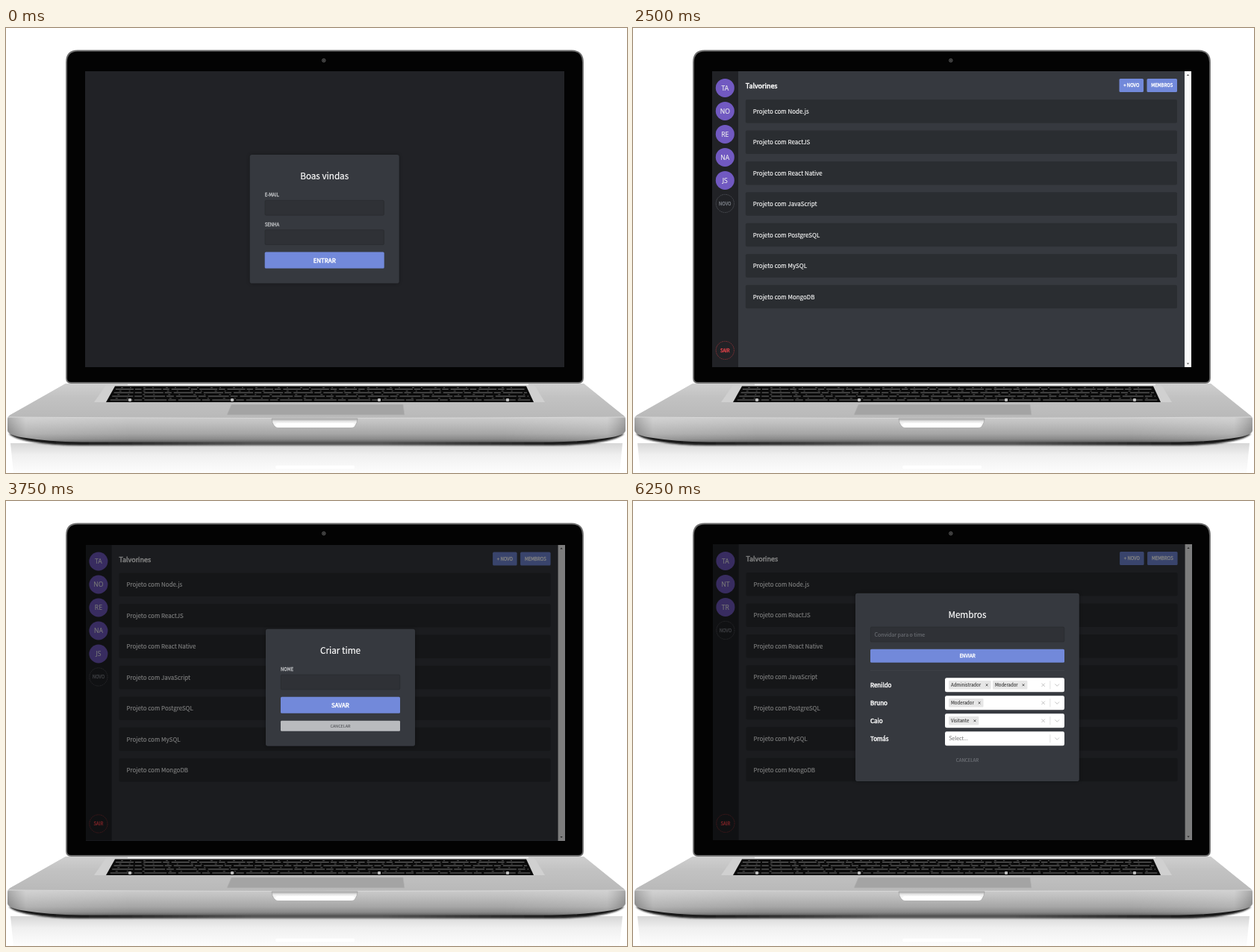
These frames come from a looping animation (832x597 px, 7500 ms). An HTML page:

```html
<!DOCTYPE html>
<html lang="pt">
<head>
<meta charset="utf-8">
<title>Projetos</title>
<style>
  html, body { margin: 0; width: 100%; height: 100%; overflow: hidden; background: #fff; }
  svg { display: block; width: 832px; height: 597px; }
  text { font-family: "Noto Sans CJK JP", "Noto Sans CJK SC", "Noto Sans CJK", sans-serif; white-space: pre; }
  .avatar { font-family: "Open Sans", "Noto Sans", sans-serif; }
</style>
</head>
<body>
<svg viewBox="0 0 832 597">
  <defs>
    <linearGradient id="deck" x1="0" y1="477" x2="0" y2="523" gradientUnits="userSpaceOnUse">
      <stop offset="0" stop-color="#cfcfcf"/><stop offset=".4" stop-color="#c2c2c2"/><stop offset="1" stop-color="#b9b9b9"/>
    </linearGradient>
    <linearGradient id="front" x1="0" y1="521" x2="0" y2="557" gradientUnits="userSpaceOnUse">
      <stop offset="0" stop-color="#cdcdcd"/><stop offset=".25" stop-color="#c0c0c0"/>
      <stop offset=".65" stop-color="#a6a6a6"/><stop offset=".85" stop-color="#8a8a8a"/><stop offset="1" stop-color="#555"/>
    </linearGradient>
    <linearGradient id="sides">
      <stop offset="0" stop-color="#000" stop-opacity=".18"/><stop offset=".03" stop-color="#fff" stop-opacity=".14"/>
      <stop offset=".2" stop-color="#fff" stop-opacity="0"/><stop offset=".8" stop-color="#fff" stop-opacity="0"/>
      <stop offset=".97" stop-color="#fff" stop-opacity=".14"/><stop offset="1" stop-color="#000" stop-opacity=".18"/>
    </linearGradient>
    <linearGradient id="mirror" x1="0" y1="0" x2="0" y2="1">
      <stop offset="0" stop-color="#d6d6d6"/><stop offset=".4" stop-color="#f0f0f0"/><stop offset="1" stop-color="#fdfdfd"/>
    </linearGradient>
    <linearGradient id="shade">
      <stop offset="0" stop-color="#111"/><stop offset=".15" stop-color="#222"/><stop offset=".4" stop-color="#555"/>
      <stop offset=".6" stop-color="#555"/><stop offset=".85" stop-color="#222"/><stop offset="1" stop-color="#111"/>
    </linearGradient>
    <linearGradient id="notch" x1="0" y1="0" x2="0" y2="1">
      <stop offset="0" stop-color="#a5a5a5"/><stop offset=".35" stop-color="#eee"/><stop offset="1" stop-color="#fff"/>
    </linearGradient>
    <filter id="glow" x="-10%" y="-10%" width="120%" height="120%"><feGaussianBlur stdDeviation="2.5"/></filter>
    <filter id="soft" x="-5%" y="-50%" width="110%" height="200%"><feGaussianBlur stdDeviation=".9"/></filter>
    <path id="body" d="M80 477H774L826 519Q830 521 830 525V540Q829 546 812 549Q775 555 730 555.500H102Q57 555 20 549Q3 546 2 540V525Q2 521 6 519Z"/>
  </defs>

  <path d="M6 557H826L822 597H10Z" fill="url(#mirror)"/>
  <path d="M4 544Q10 551 34 555Q62 560 100 560H732Q770 560 798 555Q822 551 828 544Z" fill="url(#shade)" filter="url(#soft)"/>

  <use href="#body" fill="url(#front)"/>
  <use href="#body" fill="url(#sides)"/>
  <path d="M80 477H774L826 519Q828 520 829 522Q416 525 3 522Q4 520 6 519Z" fill="url(#deck)"/>
  <path d="M3 522Q416 525 829 522" fill="none" stroke="#d6d6d6" stroke-width="1.200"/>
  <path d="M134 479H708L722 502H118Z" fill="#d0d0d0"/>
  <path d="M163 478.500H700" stroke="#f4f4f4" stroke-width="1.500"/>
  <g id="keys"></g>
  <path d="M302 505H532L534 519H296Z" fill="#a4a4a4" stroke="#b4b4b4" stroke-width=".7"/>
  <path d="M356 524H471Q470 536 462 536.500H365Q357 536 356 524Z" fill="url(#notch)" stroke="#999" stroke-width=".6"/>
  <rect x="361" y="530" width="106" height="5.500" rx="2.500" fill="#fff"/>
  <rect x="361" y="587" width="106" height="4.500" rx="2" fill="#fff"/>

  <path d="M81 470V46Q81 30.500 96 30.500H758Q773 30.500 773 46V470Q773 476 767 476H87Q81 476 81 470Z" fill="#030303" stroke="#6e6e6e" stroke-width="1.800"/>
  <circle cx="425.800" cy="43.500" r="2.300" fill="#252525" stroke="#5c5c5c" stroke-width=".9"/>
  <circle cx="425.800" cy="43.500" r=".7" fill="#777"/>
  <g id="screens"></g>
</svg>
<script>
const HOLD = 1250;
const BLUE = '#7289da', CARD = '#36393f', INPUT = '#2f3136', DARK = '#212226';

const tag = (name, attrs, inner = '') =>
  `<${name} ${Object.entries(attrs).map(([k, v]) => `${k}="${v}"`).join(' ')}>${inner}</${name}>`;
const rect = (x, y, width, height, fill, rx = 0, more = {}) =>
  tag('rect', { x, y, width, height, fill, rx, ...more });
const path = (d, stroke, width = 1) =>
  tag('path', { d, fill: 'none', stroke, 'stroke-width': width });
const text = (str, x, y, size, fill, more = {}) =>
  tag('text', { x, y, 'font-size': size, fill, stroke: fill, 'stroke-width': size / 60, ...more }, str);
const mid = { 'text-anchor': 'middle' };
const bold = (str, x, y, size, fill, more = {}) =>
  text(str, x, y, size, fill, { 'stroke-width': size / 18, ...more });

function card(x, y, w, h, title) {
  return rect(x, y, w, h, '#000', 3, { opacity: .3, filter: 'url(#glow)' })
    + rect(x, y, w, h, CARD, 2.8)
    + text(title, x + w / 2, y + 33, 11.7, '#fff', mid);
}

const input = (x, y, w) =>
  rect(x + .3, y + .3, w - .6, 19.9, INPUT, 1.5, { stroke: '#27292d', 'stroke-width': .6 });

const button = (label, x, y, w, h, size) =>
  rect(x, y, w, h, BLUE, 1.6) + bold(label, x + w / 2, y + h / 2 + size * .4, size, '#fff', mid);

// Card with labelled fields, a main button and an optional cancel button.
function form(x, y, title, labels, action, cancel) {
  const end = y + 51.5 + labels.length * 39.5;
  let out = card(x, y, 200, end - y + (cancel ? 66 : 42), title);
  labels.forEach((label, i) => {
    const top = y + 61 + i * 39.5;
    out += bold(label, x + 20, top - 5, 5.97, '#b9bbbe') + input(x + 20, top, 160);
  });
  out += button(action, x + 20, end, 160, 22, 7.96);
  if (cancel) {
    out += rect(x + 20, end + 32, 160, 14, '#b9bbbe', 1.4)
      + text('CANCELAR', x + 100, end + 41.2, 5.4, '#55575b', mid);
  }
  return out;
}

function ring(label, y, line, fill) {
  return tag('circle', { cx: 123.3, cy: y, r: 12.1, fill: 'none', stroke: line,
    'stroke-width': .7, 'stroke-dasharray': '1.7 .8' })
    + bold(label, 123.3, y + 2.3, 5.97, fill, mid);
}

function dashboard(teams) {
  let out = rect(106, 58, 642, 397, CARD) + rect(106, 58, 35, 397, DARK);
  teams.forEach((name, i) => {
    const y = 80.4 + i * 31;
    out += tag('circle', { cx: 123.3, cy: y, r: 12.5, fill: '#7159c1' })
      + text(name, 123.3, y + 3.1, 8.6, '#eee', { ...mid, class: 'avatar' });
  });
  out += ring('NOVO', 80.4 + teams.length * 31, '#5b5e64', '#72767d')
    + ring('SAIR', 432.4, '#a8363c', '#e8434a')
    + bold('Talvorines', 150.8, 81.2, 8.95, '#fff')
    + button('+ NOVO', 651.5, 68, 32.5, 18, 5.97)
    + button('MEMBROS', 688.5, 68, 40.5, 18, 5.97);
  ['Node.js', 'ReactJS', 'React Native', 'JavaScript', 'PostgreSQL', 'MySQL', 'MongoDB'].forEach((name, i) => {
    const y = 96 + i * 41.45;
    out += rect(150.8, y, 578.2, 31.5, '#2a2d31', 2) + text('Projeto com ' + name, 160.8, y + 18.8, 7.96, '#fff');
  });
  return out + rect(739, 58, 9, 397, '#fbfbfb')
    + tag('path', { d: 'M741.8 64l1.7-2 1.7 2zM741.8 449.5l1.7 2 1.7-2z', fill: '#555' });
}

const dimmed = teams => dashboard(teams) + rect(106, 58, 642, 397, '#000', 0, { opacity: .5 });

const cross = (x, y, r, color, width) =>
  path(`M${x - r} ${y - r}l${2 * r} ${2 * r}m0 ${-2 * r}l${-2 * r} ${2 * r}`, color, width);

// Each chip: label, left edge, width.
const MEMBERS = [
  ['Renildo', [['Administrador', 422.4, 56.5], ['Moderador', 481.3, 46.5]]],
  ['Bruno', [['Moderador', 422.4, 46.5]]],
  ['Caio', [['Visitante', 422.4, 40.3]]],
  ['Tomás', []]
];

function members() {
  const x = 297.4;
  let out = card(x, 123.8, 299.8, 252.2, 'Membros')
    + input(x + 20, 168.8, 260)
    + text('Convidar para o time', x + 25.6, 181.8, 6.96, '#6d7076')
    + button('ENVIAR', x + 20, 198.8, 260, 18, 6.2)
    + rect(x + 20, 227, 260, .6, '#42454c');
  MEMBERS.forEach(([name, chips], i) => {
    const y = 246.8 + i * 24;
    out += bold(name, x + 20, y + 3.2, 7.96, '#fff') + rect(x + 120, y - 9.5, 160, 19, '#fff', 2.2);
    for (const [label, left, w] of chips) {
      out += rect(left, y - 5.7, w, 11.4, '#e6e6e6', 1.1)
        + text(label, left + 3, y + 2.2, 6, '#333')
        + cross(left + w - 5.4, y, 1.4, '#444', .9);
    }
    out += chips.length ? cross(549, y, 2.2, '#bbb', .9) : text('Select...', 422.6, y + 2.6, 6.96, '#808080');
    out += rect(558, y - 5.5, .6, 11, '#ccc') + path(`M564.8 ${y - 1.3}l2.8 2.8 2.8-2.8`, '#bbb', .9);
  });
  return out + text('CANCELAR', x + 150, 349.6, 6.1, '#74777d', mid);
}

function keyboard() {
  let out = tag('path', { d: 'M146 480.5H697L707 502H134Z', fill: '#0b0b0b' });
  [484.6, 489.2, 494, 499].forEach((y, i) => {
    const left = 146 - (y - 480.5) * .5, right = 697 + (y - 480.5) * .45;
    const gap = 12 + i;
    out += tag('path', { d: `M${left + 3} ${y}H${right - 3}`, stroke: '#8c8c8c', 'stroke-width': .8,
      'stroke-dasharray': `${gap * 2} 2 ${gap * .7} 3` })
      + tag('path', { d: `M${left + 10} ${y - 2.2}H${right - 8}`, stroke: '#6c6c6c', 'stroke-width': .8,
        'stroke-dasharray': `3 ${gap - 3} 2 ${gap + 4}` });
  });
  for (const x of [164, 301, 498, 670]) out += rect(x, 497, 4, 4, '#bdbdbd', 1);
  return out;
}
document.getElementById('keys').innerHTML = keyboard();

const plain = rect(106, 58, 642, 397, DARK);
const TEAMS = ['TA', 'NO', 'RE', 'NA', 'JS'];
// Horizontal shift, vertical shift, content.
const STEPS = [
  [0, 0, plain + form(326.7, 170, 'Boas vindas', ['E-MAIL', 'SENHA'], 'ENTRAR')],
  [.6, .5, plain + form(326.7, 150.3, 'Criar conta', ['NOME', 'E-MAIL', 'SENHA'], 'CRIAR')],
  [0, 0, dashboard(TEAMS)],
  [.6, .6, dimmed(TEAMS) + form(347.4, 171.2, 'Criar time', ['NOME'], 'SAVAR', true)],
  [.6, 0, dimmed(TEAMS) + form(347.4, 171.2, 'Criar projeto', ['NOME'], 'SALVAR', true)],
  [.6, 0, dimmed(['TA', 'NT', 'TR']) + members()]
];

const screens = document.getElementById('screens');
screens.innerHTML = STEPS.map(([dx, dy, inner]) =>
  tag('g', { transform: `translate(${dx} ${dy})` }, inner)).join('');

const count = STEPS.length;
[...screens.children].forEach((screen, i) => screen.animate([
  { opacity: 1, offset: 0 }, { opacity: 1, offset: 1 / count },
  { opacity: 0, offset: 1 / count }, { opacity: 0, offset: 1 }
], { duration: HOLD * count, delay: (i - count) * HOLD, iterations: Infinity }));
</script>
</body>
</html>
```
